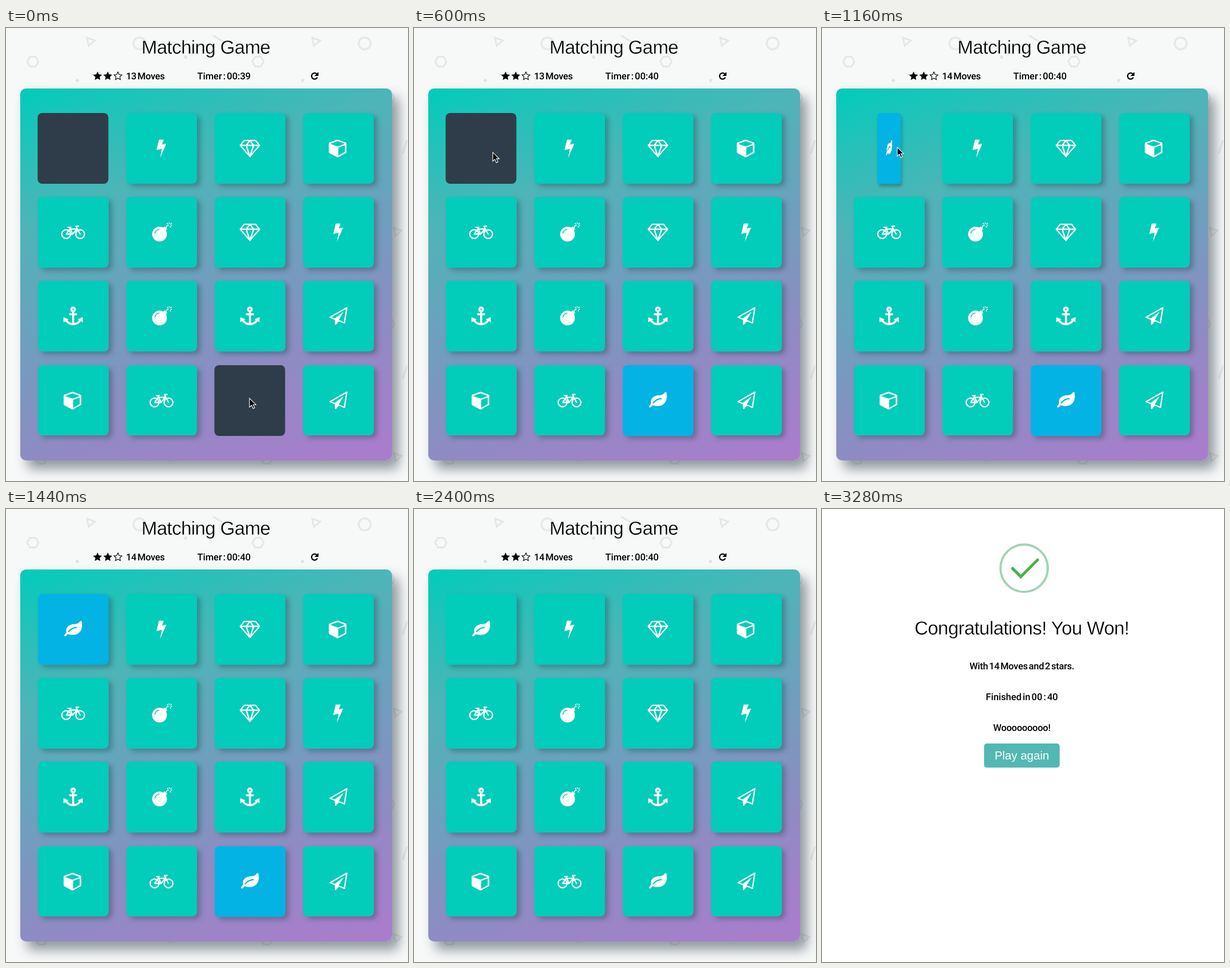
Recreate the animation shown at these times as an HTML page. Size 705 px wide and 794 px high, loop 3.4 s.

```html
<!DOCTYPE html>
<html lang="en">
<head>
<meta charset="utf-8">
<title>Matching Game</title>
<style>
  html, body { margin: 0; width: 100%; height: 100%; overflow: hidden; background: #fff; }
  .layer { position: absolute; left: 0; top: 0; width: 705px; height: 794px; overflow: hidden; }
  text { text-rendering: geometricPrecision; }
  .small { font: 500 16.5px Roboto, sans-serif; letter-spacing: -.27px; word-spacing: -2px; }
  .digits { letter-spacing: 0; }
  .title {
    font: 33px "Liberation Sans", Arial, sans-serif; letter-spacing: -.55px;
    text-anchor: middle; stroke-width: .4px;
  }
  #board {
    position: absolute; left: 25px; top: 106px; width: 651.5px; height: 651.5px; border-radius: 10px;
    background: linear-gradient(160deg, #02ccba, #4cb5b8 27%, #8f8bc3 73%, #a87ecc 95%);
    box-shadow: 12px 15px 20px rgba(46, 61, 73, .5);
  }
  .card {
    position: absolute; width: 123.5px; height: 123.5px; border-radius: 8px;
    color: #02ccba; background: currentColor; box-shadow: 6px 5px 9px rgba(46, 61, 73, .38);
  }
  .card svg { display: block; fill: #fff; stroke: none; }
  .card.closed { color: #2e3d49; box-shadow: none; }
  .card.closed svg { visibility: hidden; }
  .card.open { color: #02b3e4; }
  .line { fill: none; stroke: #fff; stroke-width: 2.3; stroke-linejoin: round; stroke-linecap: round; }
  .cut { fill: none; stroke: currentColor; stroke-width: 2.2; stroke-linecap: round; }
</style>
</head>
<body>
<div id="game" class="layer">
  <svg class="layer" viewBox="0 0 705 794">
    <defs>
      <pattern id="shapes" width="395" height="395" patternUnits="userSpaceOnUse">
        <g fill="none" stroke="#e4e7e8" stroke-width="3">
          <path id="tri" d="M142 17L156 22L145 31Z"/>
          <use href="#tri" x="143" y="333"/>
          <circle cx="234" cy="27" r="10.5"/>
          <circle cx="275" cy="123" r="10"/>
          <path id="hex" d="M37 59L42 50.5H52L57 59L52 67.5H42Z"/>
          <use href="#hex" x="15" y="301"/>
          <path d="M363 13L381 24M301 220L308 197"/>
        </g>
        <g fill="#e0e3e5"><circle cx="125" cy="92" r="2.8"/><circle cx="315" cy="51" r="2.8"/></g>
      </pattern>
      <path id="star" d="M0-7.8L2.3-2.7L7.8-2.1L3.7 1.7L4.8 7.1L0 4.4L-4.8 7.1L-3.7 1.7L-7.8-2.1L-2.3-2.7Z"/>
    </defs>
    <rect width="705" height="794" fill="#f7f8f8"/>
    <rect width="705" height="794" fill="url(#shapes)"/>
    <text class="title" x="350.5" y="45" stroke="#f7f8f8">Matching Game</text>
    <use href="#star" x="160.5" y="84"/>
    <use href="#star" x="178.5" y="84"/>
    <use href="#star" transform="translate(196.3 84) scale(.9)" fill="none" stroke="#000" stroke-width="1.2"/>
    <text class="small" id="moves" x="210.5" y="90"></text>
    <text class="small digits" id="timer" x="335.5" y="90"></text>
    <path d="M545 80.5A5.3 5.3 0 1 0 546 86.5" fill="none" stroke="#000" stroke-width="2.3"/>
    <path d="M548 77V84H541Z"/>
  </svg>
  <div id="board"></div>
  <svg class="layer" viewBox="0 0 705 794">
    <path id="cursor" d="M0 0V15.5L3.7 12.2L6.3 18L9 16.8L6.5 11.2H11.3Z" stroke="#fff" stroke-width="1.1"/>
  </svg>
</div>
<svg id="win" class="layer" viewBox="0 0 705 794">
  <rect width="705" height="794" fill="#fff"/>
  <circle cx="354.5" cy="103.7" r="41.5" fill="none" stroke="#a3d4b3" stroke-width="4"/>
  <path id="sweep" fill="none" stroke="#86c78f" stroke-width="4"/>
  <g transform="translate(314.7 63.7)" fill="#4caf50">
    <rect id="tip" height="5" rx="2.5"/><rect id="long" height="5" rx="2.5"/>
  </g>
  <text class="title" x="350.5" y="220" stroke="#fff">Congratulations! You Won!</text>
  <g class="small" text-anchor="middle">
    <text x="350.5" y="281">With 14 Moves and 2 stars.</text>
    <text class="digits" x="350.5" y="335">Finished in 00 : 40</text>
    <text x="350.5" y="389">Wooooooooo!</text>
  </g>
  <rect x="284.2" y="411" width="132.6" height="42.2" rx="5" fill="#52b8b3"/>
  <text x="350.5" y="439" text-anchor="middle" fill="#fff" font-family="Liberation Sans, Arial, sans-serif" font-size="20.5">Play again</text>
</svg>
<script>
const LOOP = 3400, FLIP = 500, FIRST = 30, SECOND = 985, MATCH = 1560, WIN = 2440;
const $ = id => document.getElementById(id);

const icons = {
  leaf: `<path d="M15-14C18 0 12 10-1 10C-6 10-8 8-10 9C-12 12-13 13-15 12C-17 11-15 9-12 6C-14-3-8-8 1-9C8-9 10-11 12-14Q14-15 15-14Z"/>
    <path class="cut" d="M-8 4Q-2-3 6-3"/>`,
  bolt: `<path d="M-4.5-15H4L.8-6.5L8.5-8L-2.5 17L.5 1L-9 3.2Z"/>`,
  gem: `<path class="line" d="M-10-13.7H10L17-5L0 14.5L-17-5ZM-17-5H17M0-13.7L-6.5-5L0 14.5L6.5-5Z"/>`,
  cube: `<path fill-rule="evenodd" transform="translate(-1.2)" d="M0-15.2L14.5-10Q15.5-9 15.5-8V7L14.5 8.5L0 16.3L-14.5 8.5L-15.5 7V-8Q-15.5-9-14.5-10Z
    M-13-7.8L0-3.1L13-7.8L0-12.5ZM1.2 13L12.8 6.5V-5.3L1.2-1Z"/>`,
  bike: `<g class="line"><circle cx="-12.3" cy="3.5" r="7.7"/><circle cx="12.3" cy="3.5" r="7.7"/>
    <path d="M-12 3.5L-6-5.5H7L-1 3.5H-12M-1 3.5L-6-8M-9-8.5H-4M12.3 3.5L5-10.3H9.5"/></g>`,
  bomb: `<circle cx="-3.5" cy="3.5" r="13"/><path d="M2-7L5.5-10L10-5.5L7-2Z"/>
    <path class="line" style="stroke-width:1.4" d="M8-8Q9-11.5 12-12M13.5-15V-16.5M16-14L17.5-15.5M16.5-11.5H18M15-9.5L16-8.5M11-14L10-15.5"/>
    <path class="cut" style="stroke-width:1.5" d="M-11.5 2Q-10-4-4.5-5"/>`,
  anchor: `<g class="line" style="stroke-width:3.6"><circle cy="-11.5" r="3.2"/>
    <path d="M0-8V13M-5.5-3H5.5M-13 7Q-9 14 0 14.5Q9 14 13 7"/></g><path d="M-17 11V2L-8 6ZM17 11V2L8 6Z"/>`,
  plane: `<path class="line" d="M15-14.5L10.8 12.2L.6 8L-4.8 14.2V6L-14.5 2.3Z"/>
    <path d="M-6.5 4.5L9.4-7.3L.6 7.4L-5 14Z"/>`
};
const layout = 'leaf bolt gem cube bike bomb gem bolt anchor bomb anchor plane cube bike leaf plane'.split(' ');

const cards = layout.map((name, i) => {
  const card = document.createElement('div');
  card.className = 'card';
  card.style.left = 31 + 155 * (i % 4) + 'px';
  card.style.top = 43 + 147.2 * Math.floor(i / 4) + 'px';
  card.innerHTML = `<svg viewBox="-62 -62 124 124">${icons[name]}</svg>`;
  $('board').append(card);
  return card;
});

const clamp = x => Math.min(1, Math.max(0, x));
const mix = (a, b, p) => a + (b - a) * p;

// The CSS "ease" curve, solved by bisection.
function ease(x) {
  const bezier = (s, a, b) => 3 * (1 - s) ** 2 * s * a + 3 * (1 - s) * s * s * b + s ** 3;
  x = clamp(x);
  let lo = 0, hi = 1;
  for (let i = 0; i < 24; i++) {
    const mid = (lo + hi) / 2;
    if (bezier(mid, .25, .25) < x) lo = mid; else hi = mid;
  }
  return bezier(lo, .1, 1);
}

function flip(card, start, t) {
  const state = t < start ? 'closed' : t < MATCH ? 'open' : '';
  card.className = 'card ' + state;
  card.style.transform = `scaleX(${-Math.cos(Math.PI * ease((t - start) / FLIP))})`;
}

// Each key is [progress, left, top, width].
const tipKeys = [[.54, 1, 19, 0], [.7, -6, 35, 50], [.84, 21, 48, 17], [1, 14, 45, 25]];
const longKeys = [[.65, 34, 54, 0], [.84, 25, 35, 55], [1, 25, 38, 47]];

function stroke(id, keys, p, angle) {
  const i = Math.max(1, keys.findIndex(k => p <= k[0]));
  const [a, b] = [keys[i - 1], keys[i]];
  const e = ease((p - a[0]) / (b[0] - a[0]));
  const [x, y, w] = [1, 2, 3].map(k => mix(a[k], b[k], e));
  const bar = $(id);
  bar.setAttribute('x', x);
  bar.setAttribute('y', y);
  bar.setAttribute('width', w);
  bar.setAttribute('transform', `rotate(${angle} ${x + w / 2} ${y + 2.5})`);
}

function sweepRing(t) {
  const turn = 360 * ease((t - 212) / 298);
  const from = Math.max(-135, 45 - turn), to = Math.min(45, 225 - turn);
  const point = deg => {
    const r = deg * Math.PI / 180;
    return `${354.5 + 41.5 * Math.cos(r)} ${103.7 + 41.5 * Math.sin(r)}`;
  };
  $('sweep').setAttribute('d', to - from > .5 ? `M${point(from)}A41.5 41.5 0 0 1 ${point(to)}` : '');
}

function moveCursor(t) {
  const nudge = ease((t - 40) / 200), p = clamp((t - 290) / 340);
  const travel = p * p * (3 - 2 * p);
  const x = mix(427 + 6 * nudge, 132, travel), y = mix(649 - 5 * nudge, 209, travel);
  $('cursor').setAttribute('transform', `translate(${x} ${y})`);
  $('cursor').style.display = t < 1200 ? '' : 'none';
}

function draw(t) {
  const won = t >= WIN;
  $('game').style.display = won ? 'none' : '';
  $('win').style.display = won ? '' : 'none';
  if (won) {
    const p = clamp((t - WIN) / 750);
    sweepRing(t - WIN);
    stroke('tip', tipKeys, p, 45);
    stroke('long', longKeys, p, -45);
    return;
  }
  flip(cards[14], FIRST, t);
  flip(cards[0], SECOND, t);
  moveCursor(t);
  $('moves').textContent = (t < SECOND ? 13 : 14) + ' Moves';
  $('timer').textContent = 'Timer : 00:' + (t < 600 ? 39 : 40);
}

const began = performance.now();
function tick() {
  draw((performance.now() - began) % LOOP);
  requestAnimationFrame(tick);
}
tick();
</script>
</body>
</html>
```
